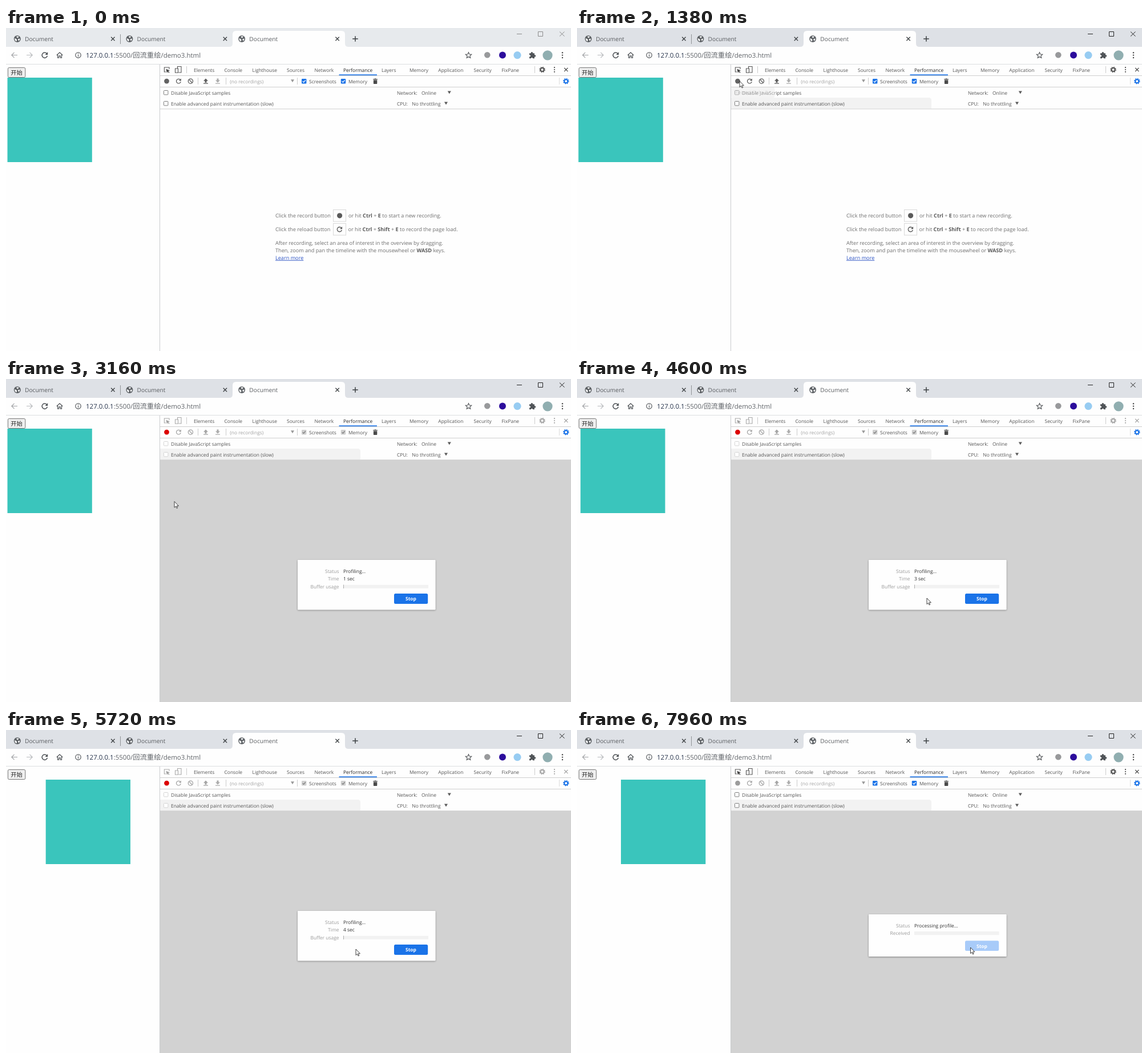
Animation, 990 px wide and 566 px high, one loop 8 s. Source, as an HTML page:

```html
<!DOCTYPE html>
<html lang="zh">
<head>
<meta charset="utf-8">
<title>Document</title>
<style>
html, body { margin: 0; width: 100%; height: 100%; overflow: hidden; background: #fefefe; }
svg { display: block; width: 100vw; height: 100vh; }
text { font: 8.45px "Open Sans", "Noto Sans CJK SC", "Noto Sans CJK", sans-serif; fill: #555; text-rendering: geometricPrecision; white-space: pre; }
.tab { font-size: 10.22px; fill: #5a5d61; }
.url { font-size: 11.5px; fill: #5f6368; }
.tip { font-size: 9.14px; fill: #6e6e6e; }
.tip .b { font-weight: 700; fill: #5a5a5a; }
.on { fill: #222; }
.dim { fill: #a3a3a3; }
.val { fill: #303030; }
.end { text-anchor: end; fill: #9b9b9b; }
.stop { font-weight: 700; fill: #fff; text-anchor: middle; }
</style>
</head>
<body>
<svg id="stage" viewBox="0 0 990 566" preserveAspectRatio="none"></svg>
<script>
const LOOP = 8000;
const text = (x, y, s, c = '') => `<text x="${x}" y="${y}" class="${c}">${s}</text>`;
const rect = (x, y, w, h, fill, more = '') => `<rect x="${x}" y="${y}" width="${w}" height="${h}" fill="${fill}" ${more}/>`;
const dot = (x, y, r, fill, more = '') => `<circle cx="${x}" cy="${y}" r="${r}" fill="${fill}" ${more}/>`;
const line = (d, color = '#5a5a5a', w = 1.2) => `<path d="${d}" fill="none" stroke="${color}" stroke-width="${w}"/>`;
const shape = (d, fill = '#5a5a5a') => `<path d="${d}" fill="${fill}"/>`;
const at = (x, y, s) => `<g transform="translate(${x} ${y})">${s}</g>`;
const group = (id, s) => `<g id="${id}">${s}</g>`;
const cross = (x, y, r, color, w) => line(`M${x - r},${y - r}l${2 * r},${2 * r}m0,${-2 * r}l${-2 * r},${2 * r}`, color, w);
const split = (x, y, h, color = '#ccc') => rect(x, y, 1, h, color);
const down = (x, y, color = '#5a5a5a') => shape(`M${x - 3},${y - 2.5}h6l-3,5z`, color);
const dots = (x, y, step, r) => [-step, 0, step].map(d => dot(x, y + d, r, '#4a4a4a')).join('');
const reload = (x, y, k = 1, color = '#5a5a5a') => `<g transform="translate(${x} ${y}) scale(${k})">` +
  line('M2.9,-2.6A3.9,3.9 0 1 0 3.8,1', color, 1.3) + shape('M4.5,-4.6v4h-4z', color) + '</g>';
const gear = (x, y, color) => dot(x, y, 3, 'none', `stroke="${color}" stroke-width="2"`) +
  dot(x, y, 4.4, 'none', `stroke="${color}" stroke-width="1.8" stroke-dasharray="1.73"`);
const globe = x => at(x, 19, dot(0, 0, 6, '#5c6064') +
  shape('M-4.6,-1.2L-1,.8L-.6,2.4L-1.6,4.6Q-4.8,3.4 -4.6,-1.2zM-1.6,-4.6L2.6,-4.4L1.8,-2.2L-.4,-1.4zM1,.2L4.6,-.6Q4.6,2.6 2.4,4z', '#f4f5f6'));
const tick = (x, y, color, w) => line(`M${x + 1.8},${y + 4.3}l1.8,1.8l3.2,-3.8`, color, w);
const ticked = (x, y) => rect(x, y, 8.4, 8.4, '#1a73e8', 'rx="1.2"') + tick(x, y, '#fff', 1.3);
const greyed = (x, y) => rect(x, y, 8.4, 8.4, '#cfcfcf', 'rx="1.2"') + tick(x, y, '#777', 1.2);
const box = (x, y, color) => rect(x + .5, y + .5, 7.4, 7.4, '#fff', `rx="1" stroke="${color}" stroke-width=".9"`);

const browser = () => {
  let s = `<rect id="strip" width="990" height="33"/>`;
  s += shape('M391,33Q397,33 397,27V11Q397,5 403,5H588Q594,5 594,11V27Q594,33 600,33z', '#fefefe');
  s += rect(0, 33, 990, 30, '#fefefe') + rect(0, 63, 990, 1, '#dcdee1') + split(200, 11, 17, '#909396');
  for (const x of [0, 196.6, 393.3])
    s += globe(x + 19.8) + text(x + 33, 22.8, 'Document', 'tab') + cross(x + 187.3, 19, 3.2, '#3c4043', 1.3);
  s += line('M607.2,19h9.6M612,14.2v9.6', '#3c4043', 1.5);
  s += `<g id="controls" fill="none" stroke-width="1"><path d="M895,10.5h9M932.5,6.5h8v8h-8zM970,6.5l8.5,8m0,-8l-8.5,8"/></g>`;
  s += line('M20,47.5H10M14.5,42.8L9.8,47.5L14.5,52.2', '#a0a2a5', 1.2);
  s += line('M36,47.5H46M41.5,42.8L46.2,47.5L41.5,52.2', '#b8babd', 1.2);
  s += reload(67.8, 47.6, 1.2, '#505458');
  s += line('M88.8,47.8L94,42.9L99.2,47.8M90.5,46.8V52.2H92.7V48.8H95.3V52.2H97.5V46.8', '#505458', 1.2);
  s += dot(126.5, 47.6, 4.7, 'none', 'stroke="#55595d" stroke-width="1.2"') + line('M126.5,47v3.2M126.5,44.7v1.2', '#55595d', 1.2);
  s += `<text x="140" y="51.7" class="url"><tspan fill="#25324a">127.0.0.1</tspan>:5500/<tspan font-size="12.3">回流重绘</tspan>/demo3.html</text>`;
  s += line('M810.5,42.6l1.5,3.4l3.7,.3l-2.8,2.5l.8,3.6l-3.2,-1.9l-3.2,1.9l.8,-3.6l-2.8,-2.5l3.7,-.3z', '#4a4d50', 1.1);
  s += dot(843.3, 47.2, 5.3, '#98999b') + dot(870, 47.6, 6, '#2c0c9c') + dot(896, 47.6, 6.6, '#97ccf2');
  s += shape('M917,44.3h2.8a1.7,1.7 0 1 1 3.2,0h3v3a1.7,1.7 0 1 1 0,3.2v2.8h-3a1.6,1.6 0 1 0 -3.2,0H917v-3a1.6,1.6 0 1 0 0,-3z', '#505458');
  s += dot(949, 47.8, 8.6, '#90aeb0') + dots(975, 47.6, 4.4, 1.2);
  return s;
};

const page = () => rect(0, 64, 269, 502, '#fefefe') +
  `<rect id="button" x="3.4" y="69.5" width="30.4" height="17" rx="2" stroke-width="1"/>` +
  `<text x="8.2" y="81.6" style="font-size:10.3px" class="on">开始</text>` +
  `<rect id="square" y="87" width="148.3" height="148" fill="#3ac5bc"/>`;

const devtools = () => {
  const names = [[329, 'Elements'], [382.5, 'Console'], [431.5, 'Lighthouse'], [492, 'Sources'], [540.5, 'Network'],
    [591, 'Performance', 'on'], [658, 'Layers'], [707, 'Memory'], [757.3, 'Application'], [819.5, 'Security'], [868.5, 'FixPane']];
  let s = rect(269, 64, 721, 502, '#fefefe') + group('shade', rect(270, 141.6, 720, 425, '#d2d2d2'));
  s += group('hint', shape('M270,122H616Q621,122 621,127V141H270z', '#f2f2f2'));
  s += [83, 103, 141.4].map(y => rect(270, y, 720, 1, '#cfcfcf')).join('') + split(269, 64, 502, '#c9cbce');
  s += rect(583.5, 81.4, 66.5, 1.6, '#1a73e8');
  s += names.map(([x, n, c]) => text(x, 76.7, n, c)).join('');
  s += split(316, 67, 12) + split(926, 67, 12);
  s += group('tools',
    line('M280.5,77H277.4V69H286V72', '#555', 1.1) + shape('M280.3,71.8l6.8,2.7l-2.8,1l2.2,2.3l-1,1l-2.2,-2.3l-1.1,2.5z', '#444') +
    line('M300.5,71V67.5H307V78H302.5M296.5,71h5v7.2h-5z', '#555', 1.1) +
    gear(939.6, 73, '#555') + dots(961, 73, 3.8, 1.1) + cross(981.3, 73, 3.1, '#444', 1.3));
  s += `<circle id="record" cx="281.5" cy="93.1" r="4.4"/>`;
  s += group('actions', reload(302.4, 93.2) +
    dot(323.4, 93.2, 4.1, 'none', 'stroke="#5a5a5a" stroke-width="1.3"') + line('M320.6,90.4l5.6,5.6', '#5a5a5a', 1.3) +
    shape('M350,88.5l4,4.2h-2.5v3h-3v-3h-2.5zM346,96.6h8v1.2h-8z'));
  s += shape('M371,95.8l4,-4.2h-2.5v-3h-3v3h-2.5zM367,96.6h8v1.2h-8z', '#aaa');
  s += [336, 385, 510].map(x => split(x, 87, 12)).join('') + split(969, 87, 12, '#ddd');
  s += text(392.3, 96.5, '(no recordings)', 'dim') + down(502, 92.8, '#999');
  s += text(531, 96.5, 'Screenshots') + text(600, 96.5, 'Memory');
  s += shape('M643.3,89.3h2.2l.8,-.9h1.6l.8,.9h2.2v1.2h-7.6zM643.9,91.3h6.4v5.6q0,1.2 -1.2,1.2h-4q-1.2,0 -1.2,-1.2z', '#4a4a4a');
  s += gear(981.3, 93.2, '#1a73e8');
  s += group('checks', ticked(518, 89) + ticked(586.8, 89) + box(276, 109, '#707070') + box(276, 128, '#707070'));
  s += group('checksOff', greyed(518, 89) + greyed(586.8, 89) + box(276, 109, '#d0d0d0') + box(276, 128, '#d0d0d0'));
  s += text(289, 116.6, 'Disable JavaScript samples') + text(289, 136, 'Enable advanced paint instrumentation (slow)');
  s += text(685, 116.6, 'Network:') + text(728, 116.6, 'Online') + down(776.8, 113);
  s += text(685, 136, 'CPU:') + text(711.3, 136, 'No throttling') + down(771, 132);
  s += `<g id="bubble" opacity=".45">${rect(270, 104, 76.5, 18, '#e9e9e9', 'rx="3"')}${text(277, 116, 'Record Ctrl + E', 'dim')}</g>`;
  return s;
};

const landing = () => {
  const b = s => `<tspan class="b">${s}</tspan>`;
  const frame = (y, h) => rect(573.5, y, 22, h, '#fefefe', 'stroke="#d8d8d8"');
  return group('landing',
    text(472, 332.2, 'Click the record button', 'tip') + frame(318.5, 20.5) + dot(584.6, 328.8, 4.6, '#5a5a5a') +
    text(600, 332.2, `or hit ${b('Ctrl')} + ${b('E')} to start a new recording.`, 'tip') +
    text(472, 355.8, 'Click the reload button', 'tip') + frame(342.5, 20.5) + reload(584.4, 352.8, 1.05) +
    text(599.5, 355.8, `or hit ${b('Ctrl')} + ${b('Shift')} + ${b('E')} to record the page load.`, 'tip') +
    text(472, 379.6, 'After recording, select an area of interest in the overview by dragging.', 'tip') +
    text(472, 392.8, `Then, zoom and pan the timeline with the mousewheel or ${b('WASD')} keys.`, 'tip') +
    `<text x="472" y="405.8" class="tip" style="fill:#2f55c4;text-decoration:underline">Learn more</text>`);
};

const panel = (y, h) => rect(511, y, 241.5, h, '#fefefe', 'rx="1" filter="url(#shadow)"');
const dialogs = () =>
  group('running', panel(317, 87.3) + text(583.5, 339.7, 'Status', 'end') + text(583.5, 353, 'Time', 'end') +
    `<text id="status" x="591" y="339.7" class="val"></text><text id="time" x="591" y="353" class="val"></text>` +
    `<rect id="meter" x="591" width="149" height="6" fill="#f2f2f2"/>` +
    group('buffer', text(583.5, 366.7, 'Buffer usage', 'end') + rect(591, 360.5, 1, 6.5, '#aaa')) +
    `<rect id="stop" x="680" y="376" width="59.2" height="18" rx="2.5"/>` + text(709.5, 388, 'Stop', 'stop')) +
  group('closing', panel(323, 74) + text(583.5, 346.2, 'Status', 'end') + text(583.5, 359.3, 'Received', 'end') +
    `<text id="progress" x="591" y="346.2" class="val"></text>` + rect(591, 353, 148.5, 6.2, '#f2f2f2') +
    rect(680, 369.3, 59.2, 17.8, '#a8cbf9', 'rx="2.5"') + text(709.5, 381.5, 'Stop', 'stop'));

const stage = document.getElementById('stage');
stage.innerHTML = `<defs><filter id="shadow" x="-5%" y="-10%" width="110%" height="125%">
<feDropShadow dx="0" dy="1" stdDeviation="1.6" flood-opacity=".4"/></filter></defs>` +
  browser() + page() + devtools() + landing() + dialogs() +
  `<path id="cursor" d="M0,0V10.6L2.5,8.4L4.1,12L5.7,11.3L4.1,7.8H7.4z" fill="#fff" stroke="#222" stroke-width=".85"/>`;

const ui = {};
for (const e of stage.querySelectorAll('[id]')) ui[e.id] = e;
const show = (id, on) => { ui[id].style.display = on ? '' : 'none'; };
const set = (id, key, v) => ui[id].setAttribute(key, v);
const say = (id, s) => { if (ui[id].textContent !== s) ui[id].textContent = s; };

// time, x, y of the pointer tip
const path = [
  [110, 844, 524], [250, 760, 440], [420, 545, 270], [580, 375, 150], [720, 290, 100], [790, 271, 90],
  [870, 285, 98], [920, 285, 98], [970, 285, 93], [1380, 285, 93], [1430, 284, 93], [1560, 282, 94],
  [1700, 220, 96], [1880, 105, 90], [2020, 45, 84], [2100, 31, 82], [2190, 25, 79], [2950, 25, 79],
  [3040, 105, 118], [3160, 294, 214], [3300, 440, 296], [3460, 550, 354], [3600, 598, 378], [3720, 612, 384],
  [3870, 612, 384], [3910, 613, 384], [6000, 613, 384], [6050, 627, 384], [6250, 662, 389], [6500, 686, 394],
  [6750, 692, 390], [7500, 692, 390], [7670, 689.5, 381]
];
const pointer = t => {
  const i = path.findIndex(p => p[0] > t);
  if (i < 0) return path[path.length - 1].slice(1);
  const [a, x, y] = path[i - 1], [b, u, v] = path[i], k = (t - a) / (b - a);
  return [x + (u - x) * k, y + (v - y) * k];
};

const bezier = (a, b, s) => 3 * a * s * (1 - s) ** 2 + 3 * b * s * s * (1 - s) + s ** 3;
const ease = p => {
  let lo = 0, hi = 1;
  for (let i = 0; i < 24; i++) {
    const mid = (lo + hi) / 2;
    if (bezier(.25, .25, mid) < p) lo = mid; else hi = mid;
  }
  return bezier(.1, 1, lo);
};

function render(t) {
  const active = t >= 1300, busy = t >= 1430, profiling = t >= 1520 && t < 7220;
  const closing = t >= 7220, enabled = !busy || t >= 7910;
  set('strip', 'fill', active ? '#dee1e6' : '#e7eaed');
  set('controls', 'stroke', active ? '#222' : '#8c8c8c');
  show('hint', active);
  show('bubble', active && !busy);
  show('landing', !busy);
  show('shade', busy);
  show('checks', enabled);
  show('checksOff', !enabled);
  set('tools', 'opacity', enabled ? 1 : .5);
  set('actions', 'opacity', busy ? .55 : 1);
  set('record', 'fill', profiling ? '#dc0000' : busy ? '#9c9c9c' : '#626262');

  show('running', busy && !closing);
  show('closing', closing);
  show('buffer', profiling);
  say('status', profiling ? 'Profiling…' : 'Initializing profiler…');
  say('time', profiling ? Math.max(0, Math.floor((t - 1500) / 1000)) + ' sec' : '');
  set('meter', 'y', profiling ? 360.7 : 356.7);
  set('stop', 'fill', t >= 6600 ? '#2b7de9' : '#1a73e8');
  say('progress', t < 7300 ? 'Stopping timeline…' : t < 7910 ? 'Loading profile…' : 'Processing profile…');

  const pressed = t >= 2420 && t < 2500, hover = t >= 2060 && t < 3000;
  set('button', 'fill', pressed ? '#f5f5f5' : hover ? '#e5e5e5' : '#efefef');
  set('button', 'stroke', pressed ? '#8d8d8d' : hover ? '#4f4f4f' : '#767676');
  set('square', 'x', 2.5 + 74.5 * ease(Math.min(1, Math.max(0, (t - 4470) / 2000))));

  show('cursor', t >= 110);
  if (t >= 110) set('cursor', 'transform', `translate(${pointer(t).join(' ')})`);
}

const start = performance.now();
function loop() {
  render((performance.now() - start) % LOOP);
  requestAnimationFrame(loop);
}
loop();
</script>
</body>
</html>
```
